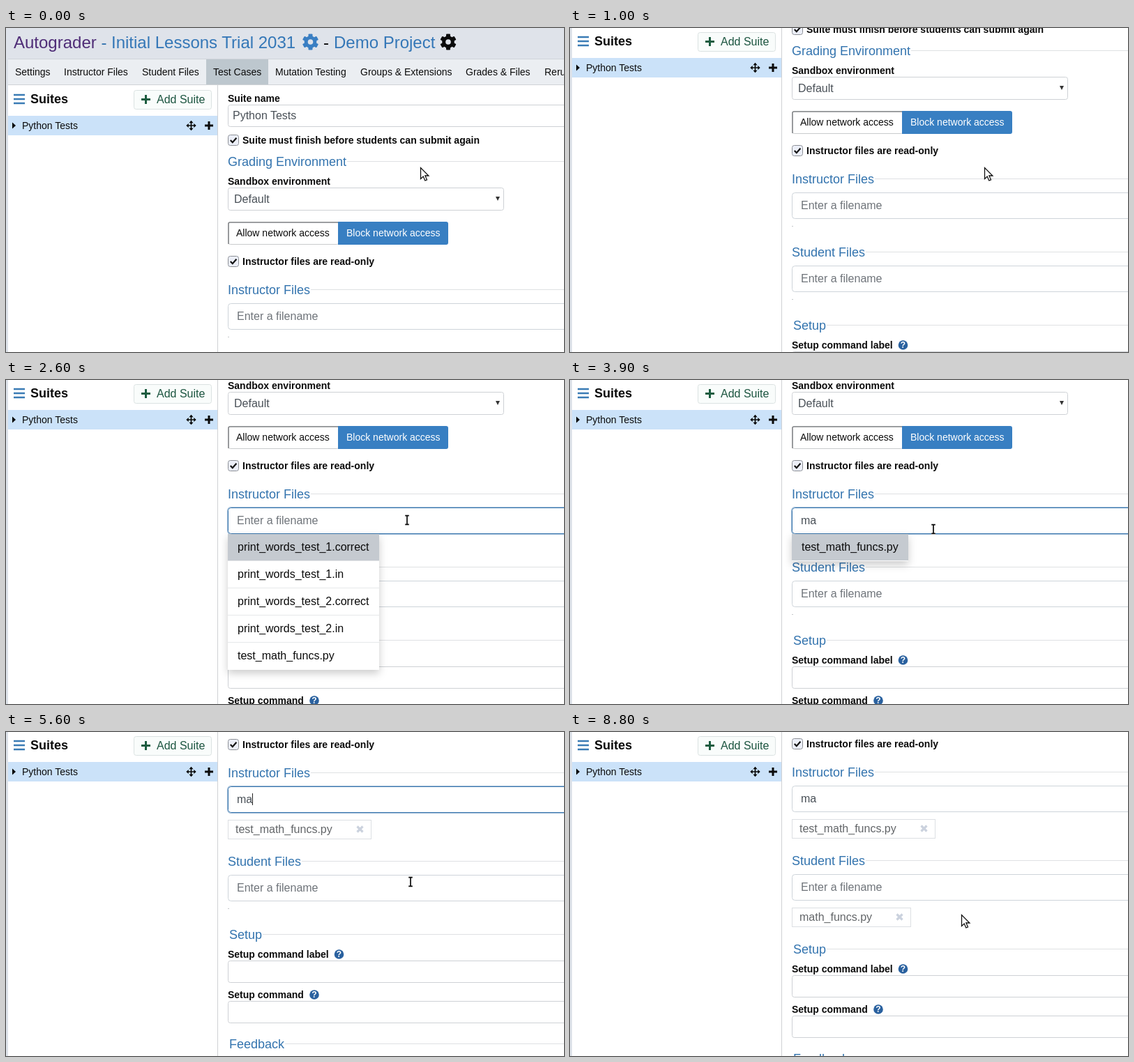
Animation, 800 px wide and 465 px high, one loop 9.3 s. Source, as an HTML page:

```html
<!DOCTYPE html>
<html lang="en">
<head>
<meta charset="utf-8">
<title>Suite editor</title>
<style>
html, body { margin: 0; width: 100%; height: 100%; overflow: hidden; background: #fff; }
svg { display: block; width: 800px; height: 465px; font-family: "Liberation Sans", Arial, sans-serif; }
text { white-space: pre; }
.menu { filter: drop-shadow(0 5px 6px rgba(0, 0, 0, .2)); }
</style>
</head>
<body>
<svg id="stage" viewBox="0 0 800 465"></svg>
<script>
const LOOP = 9300, STEP = 100;
const BLUE = '#3273ae', GREY = [206, 212, 218], FOCUS = [58, 119, 174], HOVER = [150, 180, 208];

const text = (x, y, s, size = 14, fill = '#0b0b0b', extra = '') =>
  `<text x="${x}" y="${y}" font-size="${size}" fill="${fill}" ${extra}>${s.replace(/&/g, '&amp;')}</text>`;
const bold = (x, y, s, size = 14) => text(x, y, s, size, '#0b0b0b', 'font-weight="700"');
const rect = (x, y, w, h, fill, extra = '') =>
  `<rect x="${x}" y="${y}" width="${w}" height="${h}" fill="${fill}" ${extra}/>`;
const box = (x, y, w, h, stroke = '#ced1d5', r = 3, fill = '#fff', extra = '') =>
  rect(x + .5, y + .5, w - 1, h - 1, fill, `stroke="${stroke}" rx="${r}" ${extra}`);
const path = (d, stroke, width, extra = '') =>
  `<path d="${d}" fill="none" stroke="${stroke}" stroke-width="${width}" ${extra}/>`;
const group = (id, body, extra = '') => `<g id="${id}" ${extra}>${body}</g>`;

const heading = (x, mid, s, lineX) =>
  text(x, mid + 6, s, 18, BLUE) + rect(lineX, mid - 1, 500, 1, '#dfe1e3');

const checkbox = (mid) =>
  box(318, mid - 8, 16, 16, '#8d9096', 3, '#eceff8') +
  path(`M321.8 ${mid}l3 3.2 5.6-6.4`, '#111', 2.2);

const plus = (x, y, r, color) => path(`M${x - r} ${y}h${2 * r}M${x} ${y - r}v${2 * r}`, color, 3);

function gear(x, y, color) {
  let teeth = '';
  for (let a = 0; a < 360; a += 60) teeth += rect(-3, -11.6, 6, 5, color, `rx="1" transform="rotate(${a})"`);
  return `<g transform="translate(${x} ${y})">${teeth}<circle r="6.3" fill="none" stroke="${color}" stroke-width="5"/></g>`;
}

const help = (x, y) =>
  `<circle cx="${x}" cy="${y}" r="6.8" fill="#2a619f"/>` +
  text(x, y + 4.2, '?', 12, '#fff', 'font-weight="700" text-anchor="middle"');

// Filename field with its list of chosen files; the second one sits 105px lower.
const field = (id, file, width) =>
  group(id + 'Glow', rect(317.5, 394.5, 500, 39, 'none', 'rx="4.5" stroke="#3a77ae" stroke-opacity=".5"')) +
  box(318, 395, 500, 38, '#ced4da', 4, '#fff', `id="${id}Box"`) +
  text(331, 419, 'Enter a filename', 16, '#6f747a', `id="${id}Text"`) +
  rect(331, 405, 1, 17, '#222', `id="${id}Caret"`) +
  rect(318, 443, 2, 1, '#c4c7ca', `id="${id}Dot"`) +
  group(id + 'Chip',
    box(318, 443, width, 28, '#dcdfe3', 0) + text(329, 462, file, 16, '#626568') +
    path(`M${width + 297.5} 452.5l8 8m0-8l-8 8`, '#cbd2de', 3.2));

const menu = (id, width, items) => group(id,
  rect(318, 433, width, items.length * 39, '#fff') +
  rect(318, 433, width, 38, '#c5cad0') +
  items.map((s, i) => (i ? rect(318, 432 + i * 39, width, 1, '#e6e8ea') : '') +
    text(332, 457 + i * 39, s, 16)).join(''), 'class="menu"');

const tabs = [[13, 'Settings'], [83, 'Instructor Files'], [195, 'Student Files'], [297, 'Test Cases'],
  [386, 'Mutation Testing'], [508, 'Groups & Extensions'], [659, 'Grades & Files'], [772, 'Rerun Tests']];

const header =
  rect(0, 0, 800, 44, '#dfe3ea') + rect(3, 44, 797, 38, '#ebeef2') +
  rect(3, 44, 797, 1, '#d0d4da') + rect(3, 81, 797, 1, '#cfd2d6') + rect(287, 45, 89, 36, '#bdc7ce') +
  text(11, 29, 'Autograder', 24, '#4f2d77') + text(136.4, 29, '-', 24, BLUE) +
  text(151, 29, 'Initial Lessons Trial 2031', 24, '#3477b7') + gear(436.5, 20, '#3a7fc3') +
  text(455, 29, '-', 24) + text(470, 29, 'Demo Project', 24, '#3477b7') + gear(634, 20, '#0b0b0b') +
  tabs.map(([x, s]) => text(x, 68, s)).join('');

const sidebar =
  rect(3, 82, 300, 600, '#fff') + rect(303, 82, 1, 600, '#cfd1d4') +
  path('M11 96h16M11 102h16M11 108h16', '#3a7bb5', 2.4) + bold(35, 108, 'Suites', 18) +
  box(183, 89, 112, 28, '#dbe2e2', 3, '#f9fcfb') + plus(200.5, 102.5, 6.5, '#1c5c40') +
  text(216, 108, 'Add Suite', 16, '#1c5540') +
  rect(3, 126, 300, 28, '#cbe2f9') + '<path d="M9 135.5l5 4.5-5 4.5z"/>' +
  text(23, 145, 'Python Tests') + plus(291, 140, 6, '#0b0b0b') +
  path('M260 140h11M265.5 134.5v11', '#0b0b0b', 1.7) +
  '<path d="M265.5 132.8l3 3.4h-6zM265.5 147.2l3-3.4h-6zM258.3 140l3.4-3v6zM272.7 140l-3.4-3v6z"/>';

const settings =
  bold(318, 106, 'Suite name') + box(318, 110, 500, 32) + text(325, 131, 'Python Tests', 16, '#495057') +
  checkbox(161) + bold(339, 166, 'Suite must finish before students can submit again') +
  heading(318, 192, 'Grading Environment', 489) +
  bold(318, 225, 'Sandbox environment') + box(318, 229, 396, 33) +
  text(327, 251, 'Default', 16, '#495057') + '<path d="M702 242h6l-3 6z" fill="#333"/>' +
  box(318, 278, 160, 33, '#c9cbcd', 3) + path('M319 310v-29q0-2 2-2h155', '#85888b', 1.6) +
  rect(476, 278, 158, 33, '#387fc2', 'rx="3"') + rect(476, 278, 5, 33, '#387fc2') +
  text(330, 299, 'Allow network access') + text(488, 299, 'Block network access', 14, '#fff') +
  checkbox(335) + bold(339, 340, 'Instructor files are read-only') +
  heading(318, 376, 'Instructor Files', 437);

const setup =
  heading(320, 586, 'Setup', 368) +
  bold(318, 619, 'Setup command label') + help(477.5, 614) + box(318, 623, 500, 32) +
  bold(318, 677, 'Setup command') + help(442, 672) + box(318, 681, 500, 32) +
  heading(320, 743, 'Feedback', 400);

const stage = document.getElementById('stage');
stage.innerHTML =
  rect(0, 0, 800, 465, '#fff') +
  group('main',
    settings + field('a', 'test_math_funcs.py', 206) +
    group('below',
      heading(318, 481, 'Student Files', 424) +
      `<g transform="translate(0 105)">${field('b', 'math_funcs.py', 171)}</g>` +
      group('setup', setup)) +
    menu('allMenu', 217, ['print_words_test_1.correct', 'print_words_test_1.in',
      'print_words_test_2.correct', 'print_words_test_2.in', 'test_math_funcs.py']) +
    menu('mathMenu', 167, ['test_math_funcs.py']) +
    `<g transform="translate(0 127)">${menu('studentMenu', 175, ['math_funcs.py', 'student_solution.cpp'])}</g>`) +
  rect(0, 0, 3, 465, '#dde2e9') +
  group('page', sidebar + header) +
  group('arrow', '<path d="M.5 .5v16l3.7-3.5 2.6 6 2.7-1.2-2.6-5.8h5z" fill="#fff" stroke="#111" stroke-width="1.3"/>') +
  group('beam', ['#fff', '#0b0b0b'].map((c, i) =>
    path('M-2.8-6.3h5.6M-2.8 6.3h5.6M0-6.3v12.6', c, i ? 1.7 : 3.6)).join(''));

const el = {};
stage.querySelectorAll('[id]').forEach(n => el[n.id] = n);

// Keys: time, values..., with ease-out power last.
const scrollKeys = [[600, 0, 1], [1000, 159, 2], [1100, 159, 1], [1300, 212, 3], [5200, 212, 1], [5700, 318, 3]];
const mouseKeys = [[1400, 594, 200, 1], [1600, 575, 201, 1], [3600, 575, 201, 1], [4300, 450, 231, 1],
  [4700, 450, 231, 1], [4900, 580, 215, 1], [5600, 580, 215, 1], [6000, 523, 224, 1], [7200, 523, 224, 1],
  [7300, 518, 228, 1], [7700, 430, 255, 1], [8300, 430, 255, 1], [8800, 561, 262, 1]];

function track(keys, t, col = 1) {
  let prev = keys[0];
  for (const key of keys) {
    if (t <= key[0]) {
      const u = (t - prev[0]) / (key[0] - prev[0] || 1);
      const k = t < prev[0] ? 0 : 1 - (1 - u) ** key[key.length - 1];
      return Math.round(prev[col] + (key[col] - prev[col]) * k);
    }
    prev = key;
  }
  return prev[col];
}

const within = (t, ...spans) => spans.some(([a, b]) => t >= a && t < b);
const show = (id, on) => el[id].setAttribute('visibility', on ? 'visible' : 'hidden');
const move = (id, x, y) => el[id].setAttribute('transform', `translate(${x} ${y})`);
const clamp = v => Math.max(0, Math.min(1, v));
const mix = (a, b, k) => `rgb(${a.map((v, i) => Math.round(v + (b[i] - v) * k))})`;

function paintField(id, t, focusAt, blurAt, hover, caret, picked) {
  const k = clamp((t - focusAt + 100) / 200) * clamp((blurAt + 100 - t) / 200);
  el[id + 'Box'].setAttribute('stroke', mix(hover ? HOVER : GREY, FOCUS, k));
  el[id + 'Glow'].setAttribute('opacity', k);
  show(id + 'Caret', caret);
  show(id + 'Chip', picked);
  show(id + 'Dot', !picked);
}

function draw(time) {
  const t = Math.floor(time / STEP) * STEP;
  const scroll = track(scrollKeys, t);
  const pickedA = t >= 4700, pickedB = t >= 8100;
  move('main', 0, -scroll);
  move('page', 0, -Math.min(scroll, 83));
  move('below', 0, pickedA ? 22 : 0);
  move('setup', 0, pickedB ? 22 : 0);

  const typed = t < 3000 ? '' : t < 3100 ? 'm' : 'ma';
  el.aText.textContent = typed || 'Enter a filename';
  el.aText.setAttribute('fill', typed ? '#495057' : '#6f747a');
  el.aCaret.setAttribute('x', [331, 344, 353][typed.length]);

  paintField('a', t, 2000, 6200, within(t, [1500, 4100], [4800, 5700]),
    within(t, [2000, 2600], [3000, 3700], [4200, 4700], [5300, 5800]), pickedA);
  paintField('b', t, 6200, 8400, within(t, [5700, 7600]),
    within(t, [6300, 6900], [7400, 7700]), pickedB);

  show('allMenu', within(t, [2000, 3000]));
  show('mathMenu', within(t, [3000, 4700]));
  show('studentMenu', within(t, [6300, 8100]));

  const beam = within(t, [1500, 4100], [4800, 7600]);
  const x = track(mouseKeys, t), y = track(mouseKeys, t, 2);
  show('beam', beam);
  show('arrow', !beam);
  move('beam', x, y);
  move('arrow', x, y);
}

const start = performance.now();
function tick() {
  draw((performance.now() - start) % LOOP);
  requestAnimationFrame(tick);
}
tick();
</script>
</body>
</html>
```
